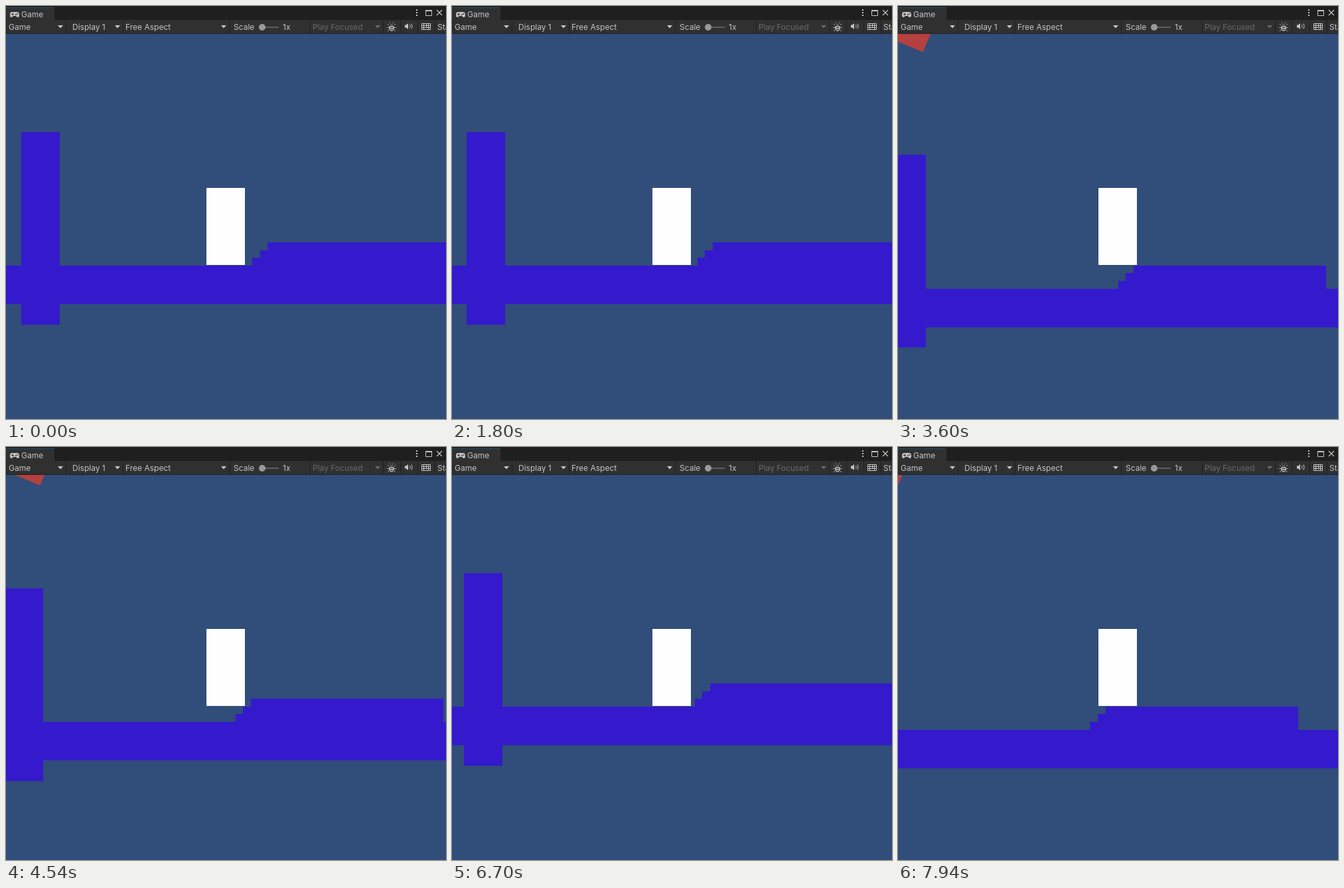
Animation, 663 px wide and 622 px high, one loop 8 s. Source, as an HTML page:

```html
<!DOCTYPE html>
<html lang="en">
<head>
<meta charset="utf-8">
<title>Game view</title>
<style>
  html, body { margin: 0; width: 100%; height: 100%; overflow: hidden; background: #314d79; }
  svg { display: block; position: absolute; left: 0; top: 0; }
  text { font: 12px Inter, "Liberation Sans", sans-serif; fill: #c4c4c4; }
  .dim { fill: #6a6a6a; }
  .icon { fill: #c4c4c4; }
  .line { fill: none; stroke: #c4c4c4; }
</style>
</head>
<body>
<svg width="663" height="622" viewBox="0 0 663 622">
  <rect width="663" height="622" fill="#314d79"/>
  <rect id="crate" x="-116" y="-116" width="116" height="116" fill="#b44040" shape-rendering="crispEdges"/>
  <g id="blocks" fill="#3519cd" shape-rendering="crispEdges"></g>
  <rect x="302" y="274" width="58" height="116" fill="#fefefe"/>

  <!-- Tab strip -->
  <rect width="663" height="21" fill="#1f1f1f"/>
  <rect y="2" width="73" height="19" fill="#303030"/>
  <rect y="2" width="73" height="1" fill="#28506f"/>
  <path class="icon" d="M9 9h8q3 0 3 4q0 4-2 4q-1.500 0-3-2h-4q-1.500 2-3 2q-2 0-2-4q0-4 3-4z"/>
  <path d="M8 12.500h4M10 10.500v4" stroke="#303030" fill="none"/>
  <circle cx="15" cy="13" r="1" fill="#303030"/>
  <circle cx="17.500" cy="11.800" r="1" fill="#303030"/>
  <text x="23" y="17">Game</text>
  <path class="icon" d="M618 5h2v2h-2zM618 9h2v2h-2zM618 13h2v2h-2z"/>
  <path class="line" d="M632.500 6.500h9v8h-9z"/>
  <path class="icon" d="M632 6h10v2h-10z"/>
  <path class="line" stroke-width="1.200" d="M649 6l8 8M657 6l-8 8"/>

  <!-- Toolbar -->
  <rect y="21" width="663" height="21" fill="#303030"/>
  <rect y="41" width="663" height="1" fill="#1f1f1f"/>
  <path stroke="#1f1f1f" d="M.5 21v20M90.500 21v20M176.500 21v20M336.500 21v20M458.500 21v20M568.500 21v20M594.500 21v20M620.500 21v20M646.500 21v20"/>
  <text x="4" y="36">Game</text>
  <text x="100" y="36">Display 1</text>
  <text x="180" y="36">Free Aspect</text>
  <text x="343" y="36">Scale</text>
  <text x="417" y="36">1x</text>
  <text x="462" y="36" class="dim">Play Focused</text>
  <text x="650" y="36">Stats</text>
  <path class="icon" d="M78 29h8l-4 4.500zM164 29h8l-4 4.500zM324 29h8l-4 4.500z"/>
  <path class="dim" d="M556 29h8l-4 4.500z"/>
  <path d="M386 32h25" stroke="#5e5e5e" stroke-width="2"/>
  <circle cx="386" cy="32" r="5" fill="#999"/>
  <path class="line" stroke-opacity=".8" d="M575 27l2.500 2.500M587 27l-2.500 2.500M574 32.500h14M575 38l2.500-2.500M587 38l-2.500-2.500M578 24.500l1.500 2M584 24.500l-1.500 2"/>
  <ellipse cx="581" cy="33" rx="4" ry="5" class="icon" fill-opacity=".8"/>
  <path d="M577 29.500h8M579 32.500h4M579 35.500h4" stroke="#303030"/>
  <path class="icon" d="M601 28.500h2l3-2.500v9l-3-2.500h-2z"/>
  <path class="line" d="M608.500 28q1.500 2.500 0 5M611 26.500q2.500 4 0 8"/>
  <path class="line" d="M626.500 26.500h13v9h-13zM626 29.500h14M626 32.500h14M629.500 27v6M633.500 27v6M636.500 27v6M629.500 33v3M636.500 33v3"/>
</svg>
<script>
const LOOP = 8000;
const UNIT = 58, STEP = UNIT / 5, GROUND = 390.8;
const GRAVITY = 569;   // px per second squared
const FOOT = 360.84;   // right edge of the player's sole

const linear = u => u;
const speedUp = u => u * u;
const smooth = u => u * u * (3 - 2 * u);

// Each walk shifts the world by dx
const walks = [
  { from: 480, to: 890, dx: 14, ease: smooth },
  { from: 1530, to: 2640, dx: -62.7, ease: linear },
  { from: 2960, to: 5940, dx: 43.4, ease: linear },
  { from: 6620, to: 7940, dx: -76.5, ease: speedUp }
];

const clamp = u => Math.max(0, Math.min(1, u));
const offsetX = t => walks.reduce((sum, w) =>
  sum + w.dx * w.ease(clamp((t - w.from) / (w.to - w.from))), 0);

const stairs = [0, 1, 2].map(i => ({
  left: 371.2 + i * STEP, top: GROUND - (i + 1) * STEP, right: 684.4, bottom: GROUND + UNIT
}));
const blocks = [
  { left: 23.2, top: 189.6, right: 23.2 + UNIT, bottom: 189.6 + 5 * UNIT },
  { left: -UNIT * 5, top: GROUND, right: UNIT * 20, bottom: GROUND + UNIT },
  ...stairs
];

// Climbs are instant; walking back off an edge starts a free fall
function offsetY(t, dx) {
  const level = stairs.filter(s => s.left + dx < FOOT).length;
  const floor = level * STEP;
  const speed = (dx - offsetX(t - 10)) * 100;
  if (speed <= 0 || level === stairs.length) return floor;
  const airtime = (stairs[level].left + dx - FOOT) / speed;
  return Math.max(floor, floor + STEP - GRAVITY * airtime ** 2 / 2);
}

const crate = document.getElementById("crate");
const group = document.getElementById("blocks");
const rects = blocks.map(() =>
  group.appendChild(document.createElementNS("http://www.w3.org/2000/svg", "rect")));

function place(rect, block, dx, dy) {
  const x = Math.round(block.left + dx), y = Math.round(block.top + dy);
  rect.setAttribute("x", x);
  rect.setAttribute("y", y);
  rect.setAttribute("width", Math.round(block.right + dx) - x);
  rect.setAttribute("height", Math.round(block.bottom + dy) - y);
}

function draw(t) {
  const dx = offsetX(t), dy = offsetY(t, dx);
  blocks.forEach((b, i) => place(rects[i], b, dx, dy));
  crate.setAttribute("transform", `translate(${77.1 + dx} ${34.6 + dy}) rotate(22.5)`);
}

const start = performance.now();
function tick() {
  draw((performance.now() - start) % LOOP);
  requestAnimationFrame(tick);
}
tick();
</script>
</body>
</html>
```
